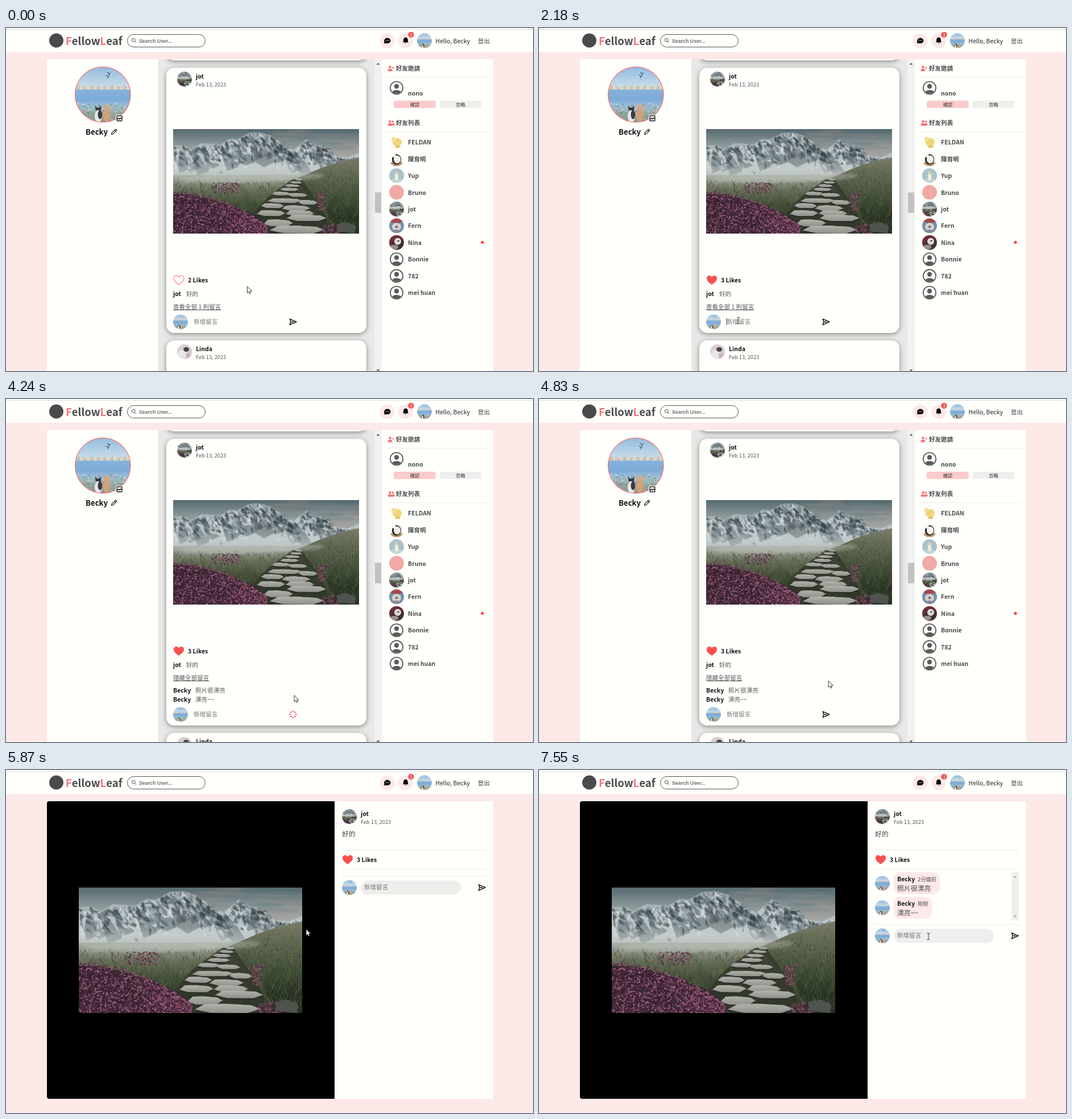
Write an HTML page with a canvas that moves like this. It is 927 px wide and 604 px high and loops after 8 s.

```html
<!DOCTYPE html>
<html lang="zh-Hant">
<head>
<meta charset="utf-8">
<title>Social feed</title>
<style>
html, body { margin: 0; width: 100%; height: 100%; overflow: hidden; background: #fde9e8; }
canvas { display: block; }
</style>
</head>
<body>
<canvas id="stage" width="927" height="604"></canvas>
<script>
const LOOP = 8000;
const ctx = document.getElementById('stage').getContext('2d');
const FONT = '"Noto Sans CJK TC", "Noto Sans CJK", sans-serif';
const PAPER = '#fffffc', PINK = '#fde9e8', CORAL = '#f47478', RED = '#f9504f', GREY = '#555';
const ME = 'Becky', POSTER = 'jot', DATE = 'Feb 13, 2023';
const S = 10.56, SMALL = 9.24, LARGE = 11.88;

// ---------- drawing helpers ----------
function text(str, x, y, { size = S, color = '#111', bold = false, align = 'left', font = FONT } = {}) {
  ctx.font = `${bold ? 700 : 400} ${size}px ${font}`;
  ctx.textAlign = align;
  ctx.fillStyle = color;
  ctx.fillText(str, x, y);
  return ctx.measureText(str).width;
}
function box(x, y, w, h, r, fill, stroke) {
  ctx.beginPath();
  ctx.roundRect(x, y, w, h, r);
  if (fill) { ctx.fillStyle = fill; ctx.fill(); }
  if (stroke) { ctx.strokeStyle = stroke; ctx.lineWidth = 1; ctx.stroke(); }
}
function disc(c, x, y, rx, color, ry = rx) {
  c.fillStyle = color;
  c.beginPath();
  c.ellipse(x, y, rx, ry, 0, 0, 7);
  c.fill();
}
function poly(c, points, color) {
  c.fillStyle = color;
  c.beginPath();
  points.forEach(p => c.lineTo(p[0], p[1]));
  c.fill();
}
function fade(c, y0, y1, ...colors) {
  const g = c.createLinearGradient(0, y0, 0, y1);
  colors.forEach((col, i) => g.addColorStop(i / (colors.length - 1), col));
  return g;
}
function icon(path, x, y, fill, stroke, width = 1) {
  ctx.save();
  ctx.translate(x, y);
  if (fill) { ctx.fillStyle = fill; ctx.fill(path); }
  if (stroke) {
    ctx.strokeStyle = stroke;
    ctx.lineWidth = width;
    ctx.lineJoin = ctx.lineCap = 'round';
    ctx.stroke(path);
  }
  ctx.restore();
}
function rule(x0, x1, y) {
  ctx.fillStyle = '#ebebe9';
  ctx.fillRect(x0, y, x1 - x0, 1);
}
function sprite(w, h, paint) {
  const cv = document.createElement('canvas');
  cv.width = w * 2;
  cv.height = h * 2;
  const c = cv.getContext('2d');
  c.scale(2, 2);
  paint(c);
  return cv;
}
function avatar(pic, x, y, r = 13) {
  const side = Math.min(pic.width, pic.height);
  ctx.save();
  ctx.beginPath();
  ctx.arc(x, y, r, 0, 7);
  ctx.clip();
  ctx.drawImage(pic, (pic.width - side) / 2, (pic.height - side) / 2, side, side, x - r, y - r, 2 * r, 2 * r);
  ctx.restore();
}
function randomizer(seed) {
  return () => (seed = (seed * 16807) % 2147483647) / 2147483647;
}

// ---------- icons ----------
const P = d => new Path2D(d);
const HEART = P('M0 8C-4 5-9 2-9-3C-9-6.2-6.8-8-4.6-8C-2.5-8-1-7 0-5.2C1-7 2.5-8 4.6-8C6.8-8 9-6.2 9-3C9 2 4 5 0 8Z');
const SEND = P('M-5.6-5.2L6.2 0L-5.6 5.2L-3.8 0ZM-3.8 0H1');
const ARROW = P('M0 0V11L2.5 8.8L4.2 12.6L6 11.8L4.4 8.1H7.7Z');
const HAND = P('M-1.3 1Q0-1 1.2 1V5.5Q2.3 4.6 3.3 6Q4.6 5.2 5.5 6.7Q7.5 6.2 7.4 8.5V11.5L5.8 16H-1L-4.6 10.2Q-4.6 8-2.8 8.7L-1.3 10Z');
const IBEAM = P('M-2-5.5H-.7L0-5L.7-5.5H2M0-5V5M-2 5.5H-.7L0 5L.7 5.5H2');
const SHOULDERS = P('M-7.5 7.5C-6.5 2.6 6.5 2.6 7.5 7.5Q0 13-7.5 7.5Z');
const PENCIL = P('M-4.5 4.5L-3.8 1.5L2.6-4.6Q4.2-5 4.8-3L-1.5 3.7ZM1.2-3L3.3-1');
const BELL = P('M0-5.5C-3-5.3-3.8-3-3.8-.5Q-3.8 1.8-5 3.3H5Q3.8 1.8 3.8-.5C3.8-3 3-5.3 0-5.5ZM-1.7 4.2Q0 6.5 1.7 4.2Z');
const UP = P('M-3 1.5L0-1.5L3 1.5Z'), DOWN = P('M-3-1.5L0 1.5L3-1.5Z');
const FRAME = P('M-3.2-4.5H3.2Q4.5-4.5 4.5-3.2V3.2Q4.5 4.5 3.2 4.5H-3.2Q-4.5 4.5-4.5 3.2V-3.2Q-4.5-4.5-3.2-4.5ZM-4 2L-1.5-.5L.5 1.5L2.5-.7L4.3 1');

// ---------- pictures ----------
const landscape = sprite(393, 222, c => {
  const rnd = randomizer(77), span = (a, b) => a + rnd() * (b - a);
  c.fillStyle = fade(c, 0, 70, '#566a70', '#8d9a9b', '#b5aaa4');
  c.fillRect(0, 0, 393, 222);
  c.filter = 'blur(3px)';
  for (let i = 0; i < 30; i++) {
    disc(c, span(190, 393), span(2, 50), span(20, 60), i % 2 ? 'rgba(196,152,140,.2)' : 'rgba(80,98,106,.16)', span(1, 4));
  }
  c.filter = 'none';
  const ridge = [[0, 36], [20, 34], [38, 42], [60, 30], [100, 32], [120, 20], [135, 22], [160, 8], [185, 7], [207, 14],
    [235, 37], [255, 44], [283, 20], [300, 34], [318, 36], [345, 58], [370, 60], [393, 50]];
  const top = x => {
    const i = Math.max(1, ridge.findIndex(p => p[0] >= x)), [a, b] = [ridge[i - 1], ridge[i]];
    return a[1] + (b[1] - a[1]) * (x - a[0]) / (b[0] - a[0]);
  };
  poly(c, [...ridge, [393, 115], [0, 115]], fade(c, 10, 100, '#98a5a9', '#b6c1c4', '#ccd4d5'));
  // shaded flanks, then rock and snow facets
  c.filter = 'blur(1px)';
  for (const [x, y] of ridge) {
    poly(c, [[x, y], [x + 22, y + 22], [x + 38, y + 48], [x + 14, y + 58], [x + 4, y + 30]], 'rgba(66,80,86,.42)');
  }
  poly(c, [[162, 30], [185, 18], [204, 42], [214, 70], [192, 82], [166, 65]], 'rgba(66,76,78,.4)');
  c.filter = 'blur(.8px)';
  for (let i = 0; i < 560; i++) {
    const x = span(0, 388), deep = rnd() * rnd(), y = top(x) + deep * 62;
    const w = span(2, 9), h = span(4, 17), lean = span(0, 14);
    const dark = rnd() < .62 - deep * .45;
    poly(c, [[x, y], [x + w, y + h * .4], [x + lean, y + h], [x - w * .2, y + h * .6]],
      dark ? `rgba(52,65,70,${span(.25, .65)})` : `rgba(226,233,235,${span(.2, .6)})`);
  }
  c.filter = 'none';
  c.fillStyle = fade(c, 72, 112, 'rgba(196,203,202,0)', '#adb3ad');
  c.fillRect(0, 72, 393, 40);
  c.fillStyle = fade(c, 98, 222, 'rgba(160,165,155,.6)', '#6b715d', '#434e38', '#2d3626', '#262d20');
  c.fillRect(0, 98, 393, 124);
  poly(c, [[255, 108], [315, 82], [350, 70], [393, 60], [393, 222], [330, 180]], fade(c, 60, 190, '#7b7c69', '#4f5c42', '#263021'));
  for (let i = 0; i < 2200; i++) {
    const x = span(0, 393), floor = x > 290 ? 95 - (x - 290) * .3 : 112;
    const y = floor + rnd() * (222 - floor), near = (y - 55) / 60;
    c.strokeStyle = `hsla(${span(65, 115)},${span(10, 26)}%,${span(16, 44)}%,.6)`;
    c.lineWidth = .8;
    c.beginPath();
    c.moveTo(x, y);
    c.lineTo(x + span(-4, 4) * near, y - 6 * near);
    c.stroke();
  }
  c.filter = 'blur(6px)';
  disc(c, 130, 106, 120, 'rgba(190,195,188,.55)', 8);
  disc(c, 260, 100, 60, 'rgba(190,195,188,.4)', 8);
  c.filter = 'none';
  const heather = (n, place, size) => {
    for (let i = 0; i < n; i++) {
      const [x, y] = place();
      disc(c, x, y, span(.6, size), `hsla(${span(318, 340)},${span(18, 34)}%,${span(16, 56)}%,.85)`);
    }
  };
  poly(c, [[252, 107], [272, 107], [298, 145], [325, 190], [330, 222], [190, 222], [170, 180], [200, 145]], 'rgba(48,54,42,.75)');
  const stones = [[266, 108, 8], [260, 114, 13], [252, 121, 16], [246, 129, 20], [228, 138, 19], [263, 141, 21], [236, 153, 37],
    [285, 157, 20], [210, 164, 24], [260, 169, 30], [207, 180, 30], [268, 180, 30], [282, 190, 42], [222, 201, 31], [262, 215, 58]];
  for (const [x, y, r] of stones) {
    const h = 1 + (y - 85) * .06, tilt = span(-1, 1);
    const slab = dy => [[x - r, y + dy + tilt], [x - r * .7, y - h + dy], [x - r * .1, y - h * 1.1 + dy], [x + r * .7, y - h * .8 + dy],
      [x + r, y + dy - tilt], [x + r * .6, y + h * .8 + dy], [x - r * .5, y + h * .75 + dy]];
    poly(c, slab(2.5), '#2b302a');
    poly(c, slab(0), fade(c, y - h, y + h, '#b0b1aa', '#8b8d86'));
  }
  poly(c, [[0, 138], [35, 139], [75, 148], [125, 164], [172, 184], [198, 206], [202, 222], [0, 222]], '#372331');
  heather(2100, () => { const x = span(0, 199), e = 132 + x * x * .0019; return [x, e + rnd() * (222 - e)]; }, 1.9);
  heather(170, () => [span(82, 140), span(114, 137)], 1.5);
  heather(150, () => [span(304, 322), span(138, 175)], 1.6);
  heather(90, () => [span(290, 385), span(95, 140)], 1.4);
  heather(160, () => [span(315, 355), span(202, 222)], 1.8);
  poly(c, [[345, 203], [367, 198], [386, 206], [384, 222], [348, 218]], '#4e534e');
});

const lake = sprite(98, 98, c => {
  const rnd = randomizer(9);
  c.fillStyle = fade(c, 0, 36, '#94bde0', '#cadde9');
  c.fillRect(0, 0, 98, 98);
  for (let x = 0; x < 98; x += 4) {
    c.fillStyle = ['#d8cbb4', '#bcc3c4', '#e2dacd'][x % 3];
    c.fillRect(x, 32 + rnd() * 4, 4, 9);
  }
  c.fillStyle = fade(c, 40, 76, '#86b2dc', '#7dacd8', '#a6c6e0');
  c.fillRect(0, 40, 98, 38);
  c.fillStyle = fade(c, 64, 98, 'rgba(160,195,212,.2)', '#94aba4', '#84978c');
  c.fillRect(0, 64, 98, 34);
  for (let i = 0; i < 120; i++) {
    const x = rnd() * 98, y = 62 + rnd() * 36;
    disc(c, x, y, .6 + rnd(), ['#d5a3b8', '#e8dfe6', '#7a9c80', '#6d8b80'][i % 4]);
  }
  disc(c, 41, 88, 6.5, '#e9e8e8', 11);
  disc(c, 44, 85, 4, '#3b3b44', 8);
  poly(c, [[35, 68], [38, 72], [43, 72], [46, 68], [46, 77], [36, 77]], '#3b3b44');
  disc(c, 56, 86, 7, '#cda17b', 12);
  poly(c, [[50, 65], [54, 69], [59, 69], [62, 65], [62, 76], [51, 76]], '#d3a780');
  c.strokeStyle = '#34495c';
  c.lineWidth = 1.1;
  for (const [x, y] of [[58, 16], [60, 11]]) {
    c.beginPath();
    c.moveTo(x - 3, y - 2);
    c.quadraticCurveTo(x, y - 1, x, y + 2);
    c.quadraticCurveTo(x + 1, y - 1, x + 3, y - 1);
    c.stroke();
  }
});

const small = (bg, ...blobs) => sprite(26, 26, c => {
  c.fillStyle = bg;
  c.fillRect(0, 0, 26, 26);
  blobs.forEach(([x, y, rx, ry, color]) => disc(c, x, y, rx, color, ry));
});
const chick = small('#fffdf3', [14, 13, 8, 7, '#eed57b'], [8, 8, 4, 4, '#f3df95'], [15, 21, 5, 2, '#e3c45d']);
const kitten = small('#fbfaf6', [13, 23, 12, 6, '#b99468'], [13, 14, 8, 9, '#242321'], [14, 14, 6, 7, '#f4f1ea'], [9, 8, 3, 3, '#f4f1ea']);
const candle = small('#a9c2cb', [13, 22, 10, 5, '#c3d2d3'], [13, 14, 3, 8, '#f1efdf'], [13, 8, 1.5, 4, '#dfc99d']);
const rose = small('#f1a9a5');
const plush = small('#6f92b0', [13, 3, 13, 5, '#a4484c'], [13, 15, 8, 7, '#d4cfca'], [13, 25, 11, 5, '#858b98'], [13, 15, 2, 2, '#665c5b']);
const owl = small('#702d38', [15, 15, 10, 10, '#3c3436'], [15, 11, 6, 6, '#ded8d5'], [9, 21, 7, 4, '#9a9190'], [16, 10, 2, 1, '#4c4242']);
const fluffy = small('#d7cfd2', [9, 18, 8, 8, '#ebe6e8'], [16, 9, 5, 4, '#4b4347'], [20, 20, 5, 5, '#c9b6bf']);

const friends = [['FELDAN', chick], ['陳育明', kitten], ['Yup', candle], ['Bruno', rose], [POSTER, landscape],
  ['Fern', plush], ['Nina', owl], ['Bonnie'], ['782'], ['mei huan']];

// ---------- page parts ----------
function person(x, y) {
  disc(ctx, x, y, 12, '#5b5b5b');
  disc(ctx, x, y, 10.2, PAPER);
  disc(ctx, x, y - 2.8, 4.2, '#5b5b5b');
  icon(SHOULDERS, x, y, '#5b5b5b');
}
function people(x, y, two) {
  disc(ctx, x - 1.5, y - 2.2, 2.3, CORAL);
  disc(ctx, x - 1.5, y + 3, 4, CORAL, 2.3);
  if (two) {
    disc(ctx, x + 3.5, y - 2, 1.9, CORAL);
    disc(ctx, x + 4, y + 3, 2.8, CORAL, 2);
  } else {
    ctx.fillStyle = CORAL;
    ctx.fillRect(x + 2, y - 1.5, 4, 1);
    ctx.fillRect(x + 3.5, y - 3, 1, 4);
  }
}
function header() {
  ctx.fillStyle = PAPER;
  ctx.fillRect(0, 0, 927, 42);
  ctx.fillStyle = '#dedede';
  ctx.fillRect(0, 2, 927, 1);
  disc(ctx, 88.5, 22, 12.5, '#4a4a4a');
  let x = 105;
  for (const [part, color] of [['F', CORAL], ['ellow', '#4a4a4a'], ['L', CORAL], ['eaf', '#4a4a4a']]) {
    x += text(part, x, 30, { size: 18.5, bold: true, color });
  }
  box(213.5, 11.5, 137, 22, 11, PAPER, '#555');
  ctx.beginPath();
  ctx.arc(224.3, 21.3, 2.9, 0, 7);
  ctx.moveTo(226.5, 23.5);
  ctx.lineTo(228.8, 25.8);
  ctx.strokeStyle = '#444';
  ctx.stroke();
  text('Search User...', 234, 25.5, { size: 8.8, bold: true, color: '#6b6b6b', font: '"Liberation Sans", sans-serif' });
  disc(ctx, 670.5, 22.5, 13, PINK);
  disc(ctx, 703, 22.5, 13, PINK);
  disc(ctx, 670.8, 22.3, 5.6, '#000', 4.8);
  poly(ctx, [[665.5, 23], [665.3, 27.3], [670, 26.8]], '#000');
  for (const dx of [-2.5, 0, 2.5]) disc(ctx, 670.8 + dx, 22.3, .8, '#fff');
  icon(BELL, 703, 22, '#000');
  disc(ctx, 712.5, 11.8, 5.1, '#f0504f');
  text('3', 712.5, 14.6, { size: 7.9, color: '#fff', align: 'center' });
  avatar(lake, 736, 22.3);
  text('Hello, ' + ME, 755.5, 27, { color: '#222' });
  text('登出', 830, 27, { color: '#444' });
}
function profile() {
  ctx.fillStyle = PAPER;
  ctx.fillRect(72, 55, 196, 549);
  disc(ctx, 170.3, 117.3, 49.3, CORAL);
  avatar(lake, 170.3, 117.3, 48);
  box(193, 152.5, 13, 13, 3, PAPER);
  icon(FRAME, 199.5, 159, null, '#111', 1.3);
  text(ME, 140, 188, { size: 13.2, bold: true });
  icon(PENCIL, 190, 183, null, '#222', 1.2);
}
function sidebar() {
  const dark = { bold: true, color: '#4b4b4b' };
  ctx.fillStyle = PAPER;
  ctx.fillRect(661, 55, 196, 549);
  people(677, 71);
  text('好友邀請', 686, 75, dark);
  rule(669, 851, 86);
  person(687, 105.5);
  text('nono', 707, 118.5, dark);
  box(682, 128, 74, 13, 3, '#fccbcb');
  box(763, 128, 73, 13, 3, '#eeeeec');
  text('確認', 719, 137.7, { size: 8.4, color: '#333', align: 'center' });
  text('忽略', 799.5, 137.7, { size: 8.4, color: '#333', align: 'center' });
  people(677, 167, true);
  text('好友列表', 686, 171, dark);
  rule(669, 851, 182);
  friends.forEach(([name, pic], i) => {
    const y = 201 + i * 29.45;
    pic ? avatar(pic, 687, y) : person(687, y);
    text(name, 707, y + 4.2, dark);
  });
  disc(ctx, 838, 377.5, 2.7, RED);
}
function card(y, h) {
  ctx.save();
  ctx.shadowColor = 'rgba(0,0,0,.42)';
  ctx.shadowBlur = 8;
  ctx.shadowOffsetY = 2;
  box(282, y, 352, h, 14, PAPER);
  ctx.restore();
}
function byline(name, pic, x, y) {
  avatar(pic, x - 20, y, 13);
  text(name, x, y - 1, { bold: true });
  text(DATE, x, y + 12.6, { size: SMALL, color: GREY });
}
function likes(x, y, liked) {
  icon(HEART, x, y, liked ? RED : null, liked ? null : CORAL, 1.1);
  text((liked ? 3 : 2) + ' Likes', x + 16, y + 4, { bold: true });
}
function spinner(x, y, t) {
  for (let i = 0; i < 8; i++) {
    const a = i * Math.PI / 4 + t / 160;
    disc(ctx, x + 5.4 * Math.cos(a), y + 5.4 * Math.sin(a), 1.45, CORAL);
  }
}
function caret(x, y) {
  ctx.fillStyle = '#333';
  ctx.fillRect(x, y - 6, 1, 12);
}
function feed(t) {
  const sent = t >= 4000, shift = sent ? 38 : 0, soft = { color: GREY };
  profile();
  ctx.save();
  ctx.beginPath();
  ctx.rect(268, 55, 393, 549);
  ctx.clip();
  ctx.fillStyle = '#e8e9e7';
  ctx.fillRect(268, 55, 393, 549);
  card(-100, 157);
  card(70, 467 + shift);
  card(550 + shift, 200);
  byline('Linda', fluffy, 334, 570 + shift);
  ctx.fillStyle = '#f1f1f0';
  ctx.fillRect(648, 55, 13, 549);
  ctx.fillStyle = '#c1c1c1';
  ctx.fillRect(649, sent ? 288.5 : 289.5, 11, 36);
  icon(UP, 654.5, 63, '#505050');
  icon(DOWN, 654.5, 603, '#505050');
  ctx.restore();

  byline(POSTER, landscape, 334, 90);
  ctx.drawImage(landscape, 294, 178, 327, 183.5);
  likes(304, 444, t >= 1240);
  text(POSTER, 294, 472, { bold: true });
  text('好的', 317, 472, soft);
  const link = text(sent ? '隱藏全部留言' : '查看全部 1 則留言', 294, 495, soft);
  ctx.fillRect(294, 496, link, 1);
  if (sent) {
    ['照片很漂亮', '漂亮~~'].forEach((line, i) => {
      text(ME, 294, 517 + i * 16, { bold: true });
      text(line, 333, 517 + i * 16, soft);
    });
  }
  const y = 517 + shift;
  avatar(lake, 307, y + .5);
  const typed = sent ? '' : '漂亮~~'.slice(0, Math.max(0, Math.floor((t - 2650) / 100)));
  const w = text(typed || '新增留言', 330, y + 4, { color: typed ? '#333' : '#757575' });
  if (t >= 2180 && t < 2690) caret(329.5, y);
  if (typed && t < 3860) caret(330 + w, y);
  if (t >= 3860 && t < 4700) spinner(504.7, y + .5, t - 4240);
  else icon(SEND, 504.7, y + .5, null, '#111', 1.4);
  sidebar();
}
function comment(y, time, line, w) {
  avatar(lake, 604, y + 19.5);
  box(624, y, w, 39, 12, PINK);
  text(ME, 630, y + 16, { bold: true });
  text(time, 666, y + 16, { size: SMALL, color: GREY });
  text(line, 630, y + 33, { size: LARGE, color: '#444' });
}
function detail(t) {
  const loaded = t >= 6120, shift = loaded ? 85 : 0;
  box(72, 55, 506, 524, [4, 0, 0, 4], '#000');
  box(578, 55, 279, 524, [0, 4, 4, 0], PAPER);
  ctx.drawImage(landscape, 128, 206.5, 393, 221.5);
  byline(POSTER, landscape, 624, 82);
  text('好的', 591, 117, { size: LARGE, color: '#444' });
  rule(591, 845, 140);
  likes(601, 158, true);
  rule(591, 845, 174);
  if (loaded) {
    comment(180, '2分鐘前', '照片很漂亮', 81);
    comment(223, '剛剛', '漂亮~~', 67);
    ctx.fillStyle = '#eeeeec';
    ctx.fillRect(831, 180, 13, 85);
    icon(UP, 837.5, 188, '#a3a3a3');
    icon(DOWN, 837.5, 258, '#a3a3a3');
  }
  rule(591, 845, 187 + shift);
  avatar(lake, 604, 207 + shift);
  box(624, 194.5 + shift, 176, 25, 12.5, '#eeeeec');
  text('新增留言', 630, 210 + shift, { color: '#757575' });
  icon(SEND, 837, 207 + shift, null, '#111', 1.4);
  if (t >= 7050 && t < 7550) caret(630, 292);
}

// ---------- pointer ----------
const route = [[80, 424.5, 455.5], [880, 308, 443], [1340, 308, 443], [1850, 350.5, 515], [3050, 350.5, 515], [3400, 507, 522],
  [4700, 507, 522], [5350, 528, 280.5], [5920, 528, 280.5], [6670, 676, 309], [7050, 685, 293]];
const shapes = [[840, ARROW], [1450, HAND], [1720, ARROW], [3340, IBEAM], [4000, HAND], [6780, ARROW], [LOOP, IBEAM]];

function pointer(t) {
  const i = route.findIndex(p => p[0] > t);
  const b = route[i < 0 ? route.length - 1 : i], a = i > 0 ? route[i - 1] : b;
  const k = a === b ? 0 : (t - a[0]) / (b[0] - a[0]), e = k * k * (3 - 2 * k);
  const shape = shapes.find(s => t < s[0])[1];
  icon(shape, a[1] + (b[1] - a[1]) * e, a[2] + (b[2] - a[2]) * e, shape === IBEAM ? null : '#fff', '#222', .9);
}

const start = performance.now();
function draw() {
  const t = (performance.now() - start) % LOOP;
  ctx.fillStyle = PINK;
  ctx.fillRect(0, 0, 927, 604);
  t < 5870 ? feed(t) : detail(t);
  header();
  pointer(t);
  requestAnimationFrame(draw);
}
draw();
</script>
</body>
</html>
```
